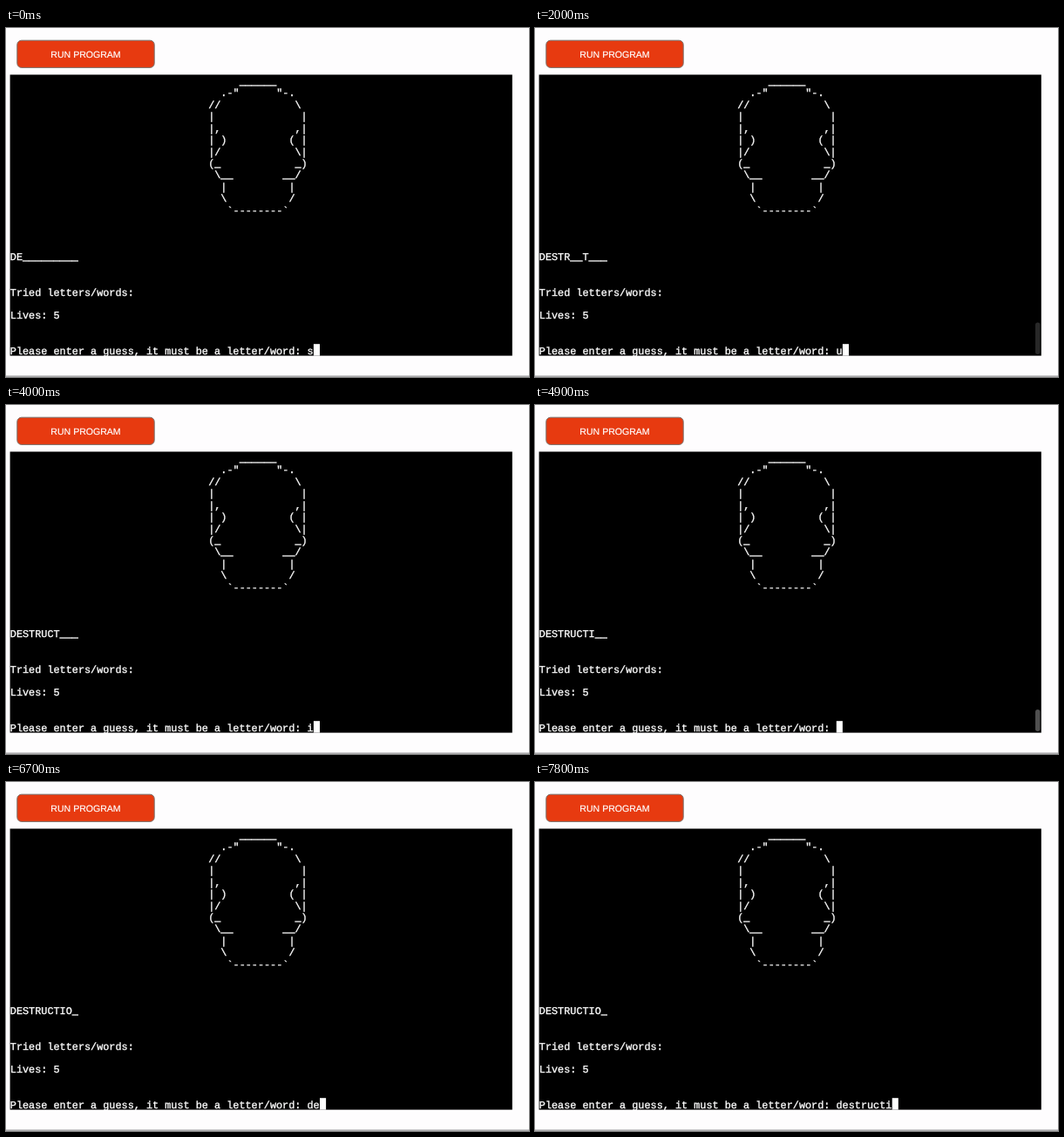
These frames come from a looping animation (600x400 px, 8000 ms). An HTML page:

```html
<!DOCTYPE html>
<html lang="en">
<head>
<meta charset="utf-8">
<title>Word guessing terminal</title>
<style>
  html, body { margin: 0; width: 100%; height: 100%; overflow: hidden; background: #fefdfe; }
  svg { display: block; width: 600px; height: 400px; }
  text { white-space: pre; text-rendering: geometricPrecision; fill: #fff; stroke: #fff; }
  #rows text { font: 11.84px "Liberation Mono", monospace; stroke-width: .35px; }
  #label { font: 10.55px "Liberation Sans", sans-serif; text-anchor: middle; stroke-width: .2px; }
</style>
</head>
<body>
<svg viewBox="0 0 600 400">
  <rect x="12.8" y="14.2" width="157.4" height="31.2" rx="5" fill="#e73a10" stroke="#77706c"/>
  <text id="label" x="91.5" y="33.8">RUN PROGRAM</text>
  <rect x="4.6" y="53.5" width="576.2" height="322.1"/>
  <g id="rows"></g>
  <rect id="cursor" y="362.2" width="7.1" height="13.4" fill="#fff"/>
  <rect id="thumb" x="574" width="5.4" rx="2.7" fill="#777"/>
  <rect y="398.6" width="600" height="1" fill="#77777a"/>
</svg>
<script>
const LOOP = 8000, LEFT = 4.8, TOP = 53.6, CELL = 7.104, ROW = 13.417;
const WORD = "DESTRUCTION";
const PROMPT = "Please enter a guess, it must be a letter/word: ";
const ART = [
  [37, "______"],
  [34, '.-"      "-.'],
  [32, "//            \\"],
  [32, "|              |"],
  [32, "|,            ,|"],
  [32, "| )          ( |"],
  [32, "|/            \\|"],
  [32, "(_            _)"],
  [33, "\\__        __/"],
  [34, "|          |"],
  [34, "\\          /"],
  [35, "`--------`"]
];

// time, typed text
const TYPED = [
  [0, "s"], [200, ""], [600, "t"], [800, ""], [1200, "r"], [1400, ""],
  [2000, "u"], [2300, ""], [2600, "c"], [2800, ""], [4000, "i"], [4400, ""],
  [5000, "o"], [5300, ""], [6700, "de"], [7000, "des"], [7100, "dest"],
  [7300, "destr"], [7400, "destru"], [7600, "destruc"], [7800, "destructi"]
];

// time, known letters, how long the scrollbar stays solid
const GUESSES = [
  [-LOOP, "DE", 0], [200, "DES", 500], [800, "DEST", 500], [1400, "DESTR", 600],
  [2300, "DESTRU", 500], [2800, "DESTRUC", 500], [4400, "DESTRUCI", 500],
  [5300, "DESTRUCIO", 500]
];
const FADE_END = 700;

const rows = document.getElementById("rows");
const cursor = document.getElementById("cursor");
const thumb = document.getElementById("thumb");

function addRow(row, column, content) {
  const node = document.createElementNS("http://www.w3.org/2000/svg", "text");
  node.setAttribute("x", LEFT + column * CELL);
  node.setAttribute("y", TOP + row * ROW + 11.4);
  node.textContent = content;
  rows.append(node);
  return node;
}

ART.forEach(([column, line], row) => addRow(row, column, line));
const wordRow = addRow(15, 0, "");
addRow(18, 0, "Tried letters/words:");
addRow(20, 0, "Lives: 5");
const inputRow = addRow(23, 0, "");

const lastIndex = (table, time) => table.findLastIndex(step => step[0] <= time);

function draw(time) {
  const typed = TYPED[lastIndex(TYPED, time)][1];
  const round = lastIndex(GUESSES, time);
  const [entered, known, hold] = GUESSES[round];
  const age = time - entered;

  wordRow.textContent = [...WORD].map(c => known.includes(c) ? c : "_").join("");
  inputRow.textContent = PROMPT + typed;
  cursor.setAttribute("x", LEFT + (PROMPT.length + typed.length) * CELL);

  // The thumb shrinks as the scrollback grows.
  const height = 1 / (0.0149 + 0.0042 * round);
  thumb.setAttribute("y", 373.9 - height);
  thumb.setAttribute("height", height);
  thumb.setAttribute("opacity", age < hold ? 1 : Math.max(0, (FADE_END - age) / 300));
}

const start = performance.now();
function tick() {
  const elapsed = (performance.now() - start) % LOOP;
  draw(Math.floor(elapsed / 100) * 100);
  requestAnimationFrame(tick);
}
tick();
</script>
</body>
</html>
```
